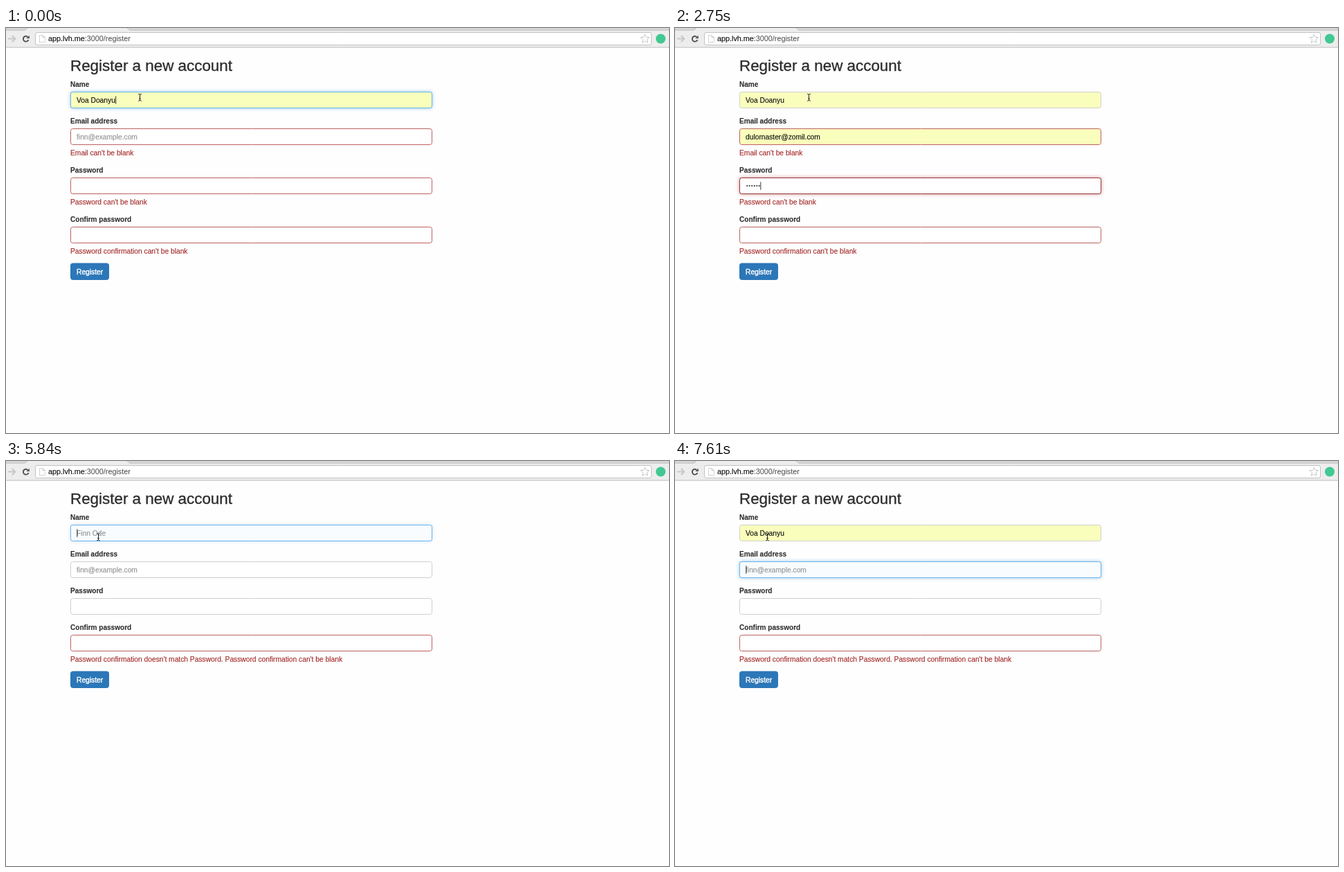
These frames come from a looping animation (958x585 px, 8 s). An HTML page with a canvas:

```html
<!DOCTYPE html>
<html lang="en">
<head>
<meta charset="utf-8">
<title>Register a new account</title>
<style>
html, body { margin: 0; width: 100%; height: 100%; overflow: hidden; background: #fefefe; }
canvas { display: block; width: 100vw; height: 100vh; }
</style>
</head>
<body>
<canvas id="stage"></canvas>
<script>
const W = 958, H = 585, LOOP = 8000, TICK = 147.3;
const canvas = document.getElementById('stage');
const ctx = canvas.getContext('2d');
const dpr = window.devicePixelRatio || 1;
canvas.width = W * dpr;
canvas.height = H * dpr;

const FAMILY = '"Liberation Sans", Arial, sans-serif';
const BODY = '10.26px ' + FAMILY;
const BOLD = 'bold 10.05px ' + FAMILY;
const LIST = '9.7px ' + FAMILY;
const RED = '#a52b2b', YELLOW = '#fafebc', INK = '#2d2d2d';
const PERSON = 'Voa Doanyu', EMAIL = 'dulornaster@zomil.com', HINT = 'finn@example.com';
const LEFT = 93, FIELD_W = 523, FIELD_H = 24, ROW = 53, NOTE = 18;

// Moments of the story, in ms
const TO_EMAIL = 140, TYPE_EMAIL = 650, PICK_EMAIL = 1250, TO_PASSWORD = 1700;
const PRESS = 3930, LOADING = 4070, RELOADED = 4370, TO_NAME = 5700;
const TYPE_NAME = 6580, PICK_NAME = 7170, BACK_TO_EMAIL = 7460;

const PLACES = { name: [193.5, 100], button: [109.5, 349], label: [135, 135.5], again: [133.5, 109.5] };

const clamp = (v, lo, hi) => Math.min(hi, Math.max(lo, v));
const within = (t, a, b) => t >= a && t < b;
// Focus borders fade in two visible stages.
const fade = (t, start) => clamp(Math.floor((t - start) / TICK) + 1, 0, 2) / 2;

function glide(t, start, end, from, to) {
  let u = clamp((t - start) / (end - start), 0, 1);
  u = u * u * (3 - 2 * u);
  return from.map((v, i) => v + (to[i] - v) * u);
}

function mouseAt(time) {
  const t = 90 + TICK * Math.floor((time - 90) / TICK);
  if (t < RELOADED) return glide(t, 3050, 3780, PLACES.name, PLACES.button);
  if (t < 4950) return glide(t, RELOADED, 4950, PLACES.button, PLACES.label);
  return glide(t, 4950, 5520, PLACES.label, PLACES.again);
}

function text(str, x, y, font, color, weight = 0.15) {
  ctx.font = font;
  ctx.fillStyle = ctx.strokeStyle = color;
  ctx.fillText(str, x, y);
  ctx.lineWidth = weight;
  ctx.strokeText(str, x, y);
}

function textWidth(str, font) {
  ctx.font = font;
  return ctx.measureText(str).width;
}

function box(x, y, w, h, r, fill, stroke, line = 1) {
  ctx.beginPath();
  ctx.roundRect(x + 0.5, y + 0.5, w - 1, h - 1, r);
  if (fill) { ctx.fillStyle = fill; ctx.fill(); }
  if (stroke) { ctx.strokeStyle = stroke; ctx.lineWidth = line; ctx.stroke(); }
}

function shape(points, fill, stroke, line = 1) {
  ctx.beginPath();
  points.forEach(([x, y]) => ctx.lineTo(x, y));
  ctx.closePath();
  if (stroke) { ctx.strokeStyle = stroke; ctx.lineWidth = line; ctx.stroke(); }
  if (fill) { ctx.fillStyle = fill; ctx.fill(); }
}

function line(points, color, width = 1) {
  ctx.beginPath();
  points.forEach(([x, y]) => ctx.lineTo(x, y));
  ctx.strokeStyle = color;
  ctx.lineWidth = width;
  ctx.stroke();
}

function disc(x, y, r, color) {
  ctx.beginPath();
  ctx.arc(x, y, r, 0, 7);
  ctx.fillStyle = color;
  ctx.fill();
}

function tabStrip() {
  ctx.fillStyle = '#ededed';
  ctx.fillRect(0, 0, W, 28);
  ctx.fillStyle = '#d8d8d8';
  ctx.fillRect(0, 0, 29, 2.5);
  ctx.fillRect(178, 0, W, 2.5);
  line([[0, 3], [27, 3], [31, 0]], '#b4b4b4');
  line([[175, 0], [179, 3], [W, 3]], '#b4b4b4');
  ctx.fillStyle = '#bdbdbd';
  ctx.fillRect(0, 27.5, W, 1);
}

function reloadIcon(x, y) {
  ctx.strokeStyle = '#505050';
  ctx.lineWidth = 1.9;
  ctx.beginPath();
  ctx.arc(x, y, 3.9, 0.35, 5.4);
  ctx.stroke();
  shape([[x + 5, y - 5], [x + 5, y - 0.6], [x + 0.6, y - 0.6]], '#505050');
}

function stopIcon(x, y) {
  const r = 4.3;
  line([[x - r, y - r], [x + r, y + r]], '#505050', 2.1);
  line([[x + r, y - r], [x - r, y + r]], '#505050', 2.1);
}

function browserBar(loading, badge) {
  tabStrip();
  line([[3, 15.5], [13, 15.5]], '#c8c8c8', 2);
  line([[8.8, 11], [13.3, 15.5], [8.8, 20]], '#c8c8c8', 2);
  if (loading) stopIcon(29, 15.5);
  else reloadIcon(28.8, 15.7);

  box(42, 6, 891, 19, 2.5, '#fff', '#c2c2c2');
  shape([[48.5, 10.5], [53, 10.5], [56, 13.5], [56, 20.5], [48.5, 20.5]], '#fff', '#a9a9a9');
  line([[53, 10.5], [53, 13.5], [56, 13.5]], '#b5b5b5', 0.8);
  const font = '10.8px ' + FAMILY, host = 'app.lvh.me';
  text(host, 61, 19.3, font, '#111');
  text(':3000/register', 61 + textWidth(host, font), 19.3, font, '#505050', 0.05);

  const star = Array.from({ length: 10 }, (_, i) => {
    const a = -Math.PI / 2 + i * Math.PI / 5, r = i % 2 ? 2.7 : 6.2;
    return [923.3 + r * Math.cos(a), 15.8 + r * Math.sin(a)];
  });
  shape(star, '#fff', '#969696');
  disc(946, 15.5, 7, badge);
}

// focus runs from 0 to 1 while the border fades in
function field(y, { error, focus = 0, filled, value = '', hint = '', dots = 0, caret }) {
  const rest = error ? '#bb6261' : '#cfcfcf';
  const lit = error ? '#963a3a' : '#6cb3e9';
  const fill = filled ? YELLOW : focus && !error ? '#f9fcff' : '#fff';
  if (focus) {
    ctx.save();
    ctx.globalAlpha = focus;
    ctx.shadowColor = error ? 'rgba(206,132,131,.8)' : 'rgba(102,175,233,.6)';
    ctx.shadowBlur = 5 * dpr;
    box(LEFT, y, FIELD_W, FIELD_H, 3, '#fff', lit);
    ctx.restore();
  }
  box(LEFT, y, FIELD_W, FIELD_H, 3, fill, focus ? lit : rest);
  if (value) text(value, 102, y + 15.5, BODY, filled ? '#111' : '#555');
  else text(hint, 102, y + 15.5, BODY, '#939393');
  for (let i = 0; i < dots; i++) disc(104.2 + i * 3.5, y + 12, 1.15, '#555');
  if (caret) {
    ctx.fillStyle = '#222';
    ctx.fillRect(102.4 + (dots ? dots * 3.5 : textWidth(value, BODY)), y + 6.3, 0.9, 11.5);
  }
}

function dropdown(y, items, picked) {
  const pitch = 17.3, h = items.length * pitch + 1;
  box(LEFT, y, FIELD_W, h, 0, '#fbfdff', '#b9cad8');
  if (picked) {
    ctx.fillStyle = '#dcdcdc';
    ctx.fillRect(LEFT + 1, y + 1, FIELD_W - 2, pitch - 1);
  }
  items.forEach((s, i) => text(s, 96, y + 13.5 + i * pitch, LIST, '#000', 0.2));
}

function button(y, hover, pressed) {
  if (pressed) {
    ctx.save();
    ctx.shadowColor = '#5aa5f0';
    ctx.shadowBlur = 3 * dpr;
    box(LEFT - 0.5, y - 0.5, 57, 25.5, 3.5, '#4a9bea', '#4a9bea', 2);
    ctx.restore();
  }
  const fill = pressed ? '#215d95' : hover ? '#276296' : '#2c77b8';
  box(LEFT, y, 56, 24.5, 3, fill, fill);
  text('Register', 102, y + 16, BODY, '#fff', 0.4);
}

function iBeam() {
  for (const side of [-1, 1]) {
    line([[side * 2.3, -5], [0, -4], [0, 4.5], [side * 2.3, 5.5]], '#222');
  }
  line([[-1.3, 2], [1.3, 2]], '#222');
}

function arrow() {
  shape([[0, 0], [0, 9.6], [2.2, 7.6], [3.8, 11.2], [5.3, 10.5], [3.8, 7.1], [6.8, 6.9]],
    '#000', '#fff', 1.6);
}

function hand() {
  ctx.rotate(-0.25);
  box(-1.8, 3, 8.5, 7.5, 2, '#fff', '#111');
  box(-1.4, -0.8, 3, 8, 1, '#fff', '#111');
  ctx.fillStyle = '#fff';
  ctx.fillRect(-0.4, 4.2, 5.5, 4.5);
}

function pointer(draw, x, y) {
  ctx.save();
  ctx.translate(x, y);
  draw();
  ctx.restore();
}

function firstForm(t) {
  const picked = t >= PICK_EMAIL;
  return {
    pressed: t >= PRESS,
    rows: [
      { label: 'Name', value: PERSON, filled: true, focus: t < TO_EMAIL ? 1 : 0, caret: t < TO_EMAIL },
      {
        label: 'Email address', error: "Email can't be blank", hint: HINT, filled: picked,
        value: picked ? EMAIL : t >= TYPE_EMAIL ? EMAIL[0] : '',
        focus: fade(t, TO_EMAIL) - fade(t, TO_PASSWORD),
        caret: within(t, TO_EMAIL, 1100) || within(t, 1400, TO_PASSWORD),
        list: within(t, TYPE_EMAIL, 1400) && [EMAIL]
      },
      {
        label: 'Password', error: "Password can't be blank",
        dots: clamp(2 * Math.floor((t - 1850) / 300), 0, 8),
        focus: t < PRESS ? fade(t, TO_PASSWORD) : 0,
        caret: within(t, TO_PASSWORD, 3350)
      },
      { label: 'Confirm password', error: "Password confirmation can't be blank" }
    ]
  };
}

function secondForm(t) {
  const picked = t >= PICK_NAME;
  const typed = clamp(Math.floor((t - TYPE_NAME) / 150) + 1, 0, 2);
  return {
    rows: [
      {
        label: 'Name', hint: 'Finn Ode', filled: picked,
        value: picked ? PERSON : PERSON.slice(0, typed),
        focus: fade(t, TO_NAME) - fade(t, BACK_TO_EMAIL),
        caret: within(t, TO_NAME, 6280) || within(t, TYPE_NAME, PICK_NAME),
        list: within(t, TYPE_NAME, PICK_NAME + 150) && [PERSON, 'Voa', 'voa', 'voa1']
      },
      {
        label: 'Email address', hint: HINT,
        focus: fade(t, BACK_TO_EMAIL), caret: t >= BACK_TO_EMAIL
      },
      { label: 'Password' },
      {
        label: 'Confirm password',
        error: "Password confirmation doesn't match Password. Password confirmation can't be blank"
      }
    ]
  };
}

function drawForm({ rows, pressed }, mx, my) {
  let y = 92, kind = arrow, menu;
  for (const row of rows) {
    text(row.label, LEFT, y - 7.5, BOLD, INK, 0.1);
    field(y, row);
    if (row.error) text(row.error, LEFT, y + 38.5, BODY, RED);
    if (row.list) menu = [y + FIELD_H, row.list, row.filled];
    if (within(my, y, y + FIELD_H)) kind = iBeam;
    y += ROW + (row.error ? NOTE : 0);
  }
  y -= 18.5;
  const hover = mx < LEFT + 56 && within(my, y, y + 24.5);
  button(y, hover, pressed);
  if (menu) dropdown(...menu);
  pointer(hover ? hand : kind, mx, my);
}

function draw(t) {
  ctx.setTransform(dpr, 0, 0, dpr, 0, 0);
  ctx.lineJoin = 'round';
  ctx.fillStyle = '#fefefe';
  ctx.fillRect(0, 0, W, H);
  browserBar(within(t, LOADING, RELOADED), within(t, LOADING, 5550) ? '#c3c3c3' : '#41c893');
  text('Register a new account', LEFT, 62.3, '22.4px ' + FAMILY, INK, 0.35);
  drawForm(t < RELOADED ? firstForm(t) : secondForm(t), ...mouseAt(t));
}

const start = performance.now();
function tick() {
  draw((performance.now() - start) % LOOP);
  requestAnimationFrame(tick);
}
tick();
</script>
</body>
</html>
```
